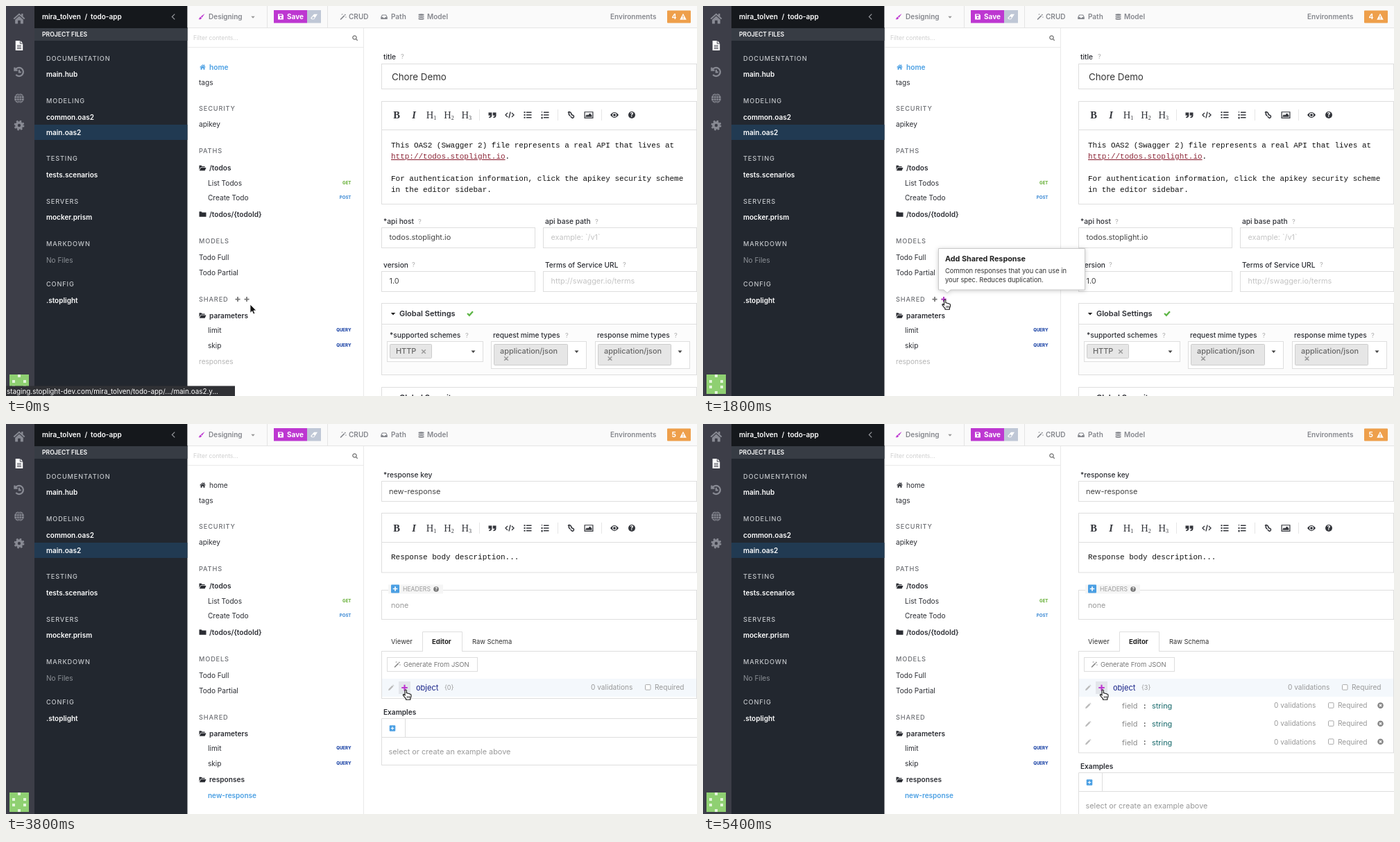
An HTML page for the animation above (5.5 s loop, 996x562 px).

```html
<!DOCTYPE html>
<html lang="en">
<head>
<meta charset="utf-8">
<title>API editor</title>
<style>
html, body { margin: 0; width: 100%; height: 100%; overflow: hidden; background: #fff }
svg { display: block; width: 996px; height: 562px; font-family: Inter, sans-serif }
text { white-space: pre }
.mono { font-family: "Liberation Mono", monospace }
.serif { font-family: "Liberation Serif", serif }
.caps { letter-spacing: .85px }
.end { text-anchor: end }
.mid { text-anchor: middle }
</style>
</head>
<body>
<svg id="stage" viewBox="0 0 996 562"></svg>
<script>
const LOOP = 5500, ROW = 26.1;
const BLUE = '#4a9fe3', PURPLE = '#bd37d1', LINE = '#dedede', INK = '#2b2d33';

// Paths are centred on the origin in a 16 unit box.
const ICONS = {
  home: 'M-8 0 0-7 3-4.4V-6.5H5.2V-2.5L8 0 6.5 1.2 0-4.6-6.5 1.2zM-5.5 1.6 0-3.2 5.5 1.6V7H1.8V2.6H-1.8V7H-5.5z',
  file: 'M-6-8H1V-3H6V8H-6zM2-8 6-4H2zM-3.5-.5V.7H3.5V-.5zM-3.5 2V3.2H3.5V2zM-3.5 4.5V5.7H3.5V4.5z',
  open: 'M-8-6H-3L-1.5-4H5V-2H-4.5L-8 4zM-4-1H8L5 6H-7.5z',
  folder: 'M-8-6H-3L-1.5-4H8V6H-8z',
  pencil: 'M-7 7-6 3 3-6 6-3-3 6zM4-7 5-8 8-5 7-4z',
  brush: 'M8-8 1 2-2-1zM-3 0 0 3C-1 7-5 7-8 6-5 5-6 1-3 0z',
  wand: 'M-8 6 2-4 4-2-6 8zM3-5 5-7 7-5 5-3zM-4-7H-2V-5H-4zM6 0H8V2H6zM-1-8H0V-7H-1z',
  inbox: 'M-5-5H5L8 1V6H-8V1zM-3.8-3.2-5.8 1H-2.5L-1.5 3H1.5L2.5 1H5.8L3.8-3.2z',
  stack: 'M-7-6.5Q0-9 7-6.5V-3.5Q0-1-7-3.5zM-7-2Q0 .5 7-2V1.5Q0 4-7 1.5zM-7 3Q0 5.5 7 3V6.5Q0 9-7 6.5z',
  save: 'M-7-7H4L7-4V7H-7zM-4-5.5V-2H3V-5.5zM-2 2.5A2 2 0 1 0 2 2.5 2 2 0 1 0-2 2.5z',
  eraser: 'M-8 3 0-6H8L0 6H-5zM-5.5 3-3.5 4.6H-1L1.5 1.2-2-.8z',
  warn: 'M0-8 8 7H-8zM-1-3V2H1V-3zM-1 3.5V5.5H1V3.5z',
  quote: 'M-8-5H-1V1Q-1 6-7 6V4Q-4 4-4 1H-8zM1-5H8V1Q8 6 2 6V4Q5 4 5 1H1z',
  list: 'M-8-7H-5V-4H-8zM-8-1.5H-5V1.5H-8zM-8 4H-5V7H-8zM-3-6.5H8V-4.5H-3zM-3-1H8V1H-3zM-3 4.5H8V6.5H-3z',
  ordered: 'M-7-8H-6V-4H-7zM-8-1.5H-5V1.5H-8zM-8 4H-5V8H-8zM-3-6.5H8V-4.5H-3zM-3-1H8V1H-3zM-3 4.5H8V6.5H-3z',
  image: 'M-8-6H8V6H-8zM-6.5-4.5V4.5H6.5V-4.5zM-5.5 3.5V1.5L-3-1-1.5.5 2-3 5.5.5V3.5z',
  eye: 'M-8 0Q0-11 8 0 0 11-8 0zM-4 0A4 4 0 1 0 4 0 4 4 0 1 0-4 0zM-2.5 0A2.5 2.5 0 1 0 2.5 0 2.5 2.5 0 1 0-2.5 0z',
  trash: 'M-6-5H6V-3H-6zM-2-7H2V-5H-2zM-5-2H5V8H-5z',
  plus: 'M-8-2H-2V-8H2V-2H8V2H2V8H-2V2H-8z',
  caret: 'M-8-4H8L0 5z',
};
const STROKES = {
  history: 'M-6-3A6.5 6.5 0 1 1-5 4.3M-7-7V-2.5H-2.5M0-3.5V.5H3',
  search: 'M-6-1A5 5 0 1 0 4-1 5 5 0 1 0-6-1M2.7 2.7 7 7',
  code: 'M-4-4-8 0-4 4M4-4 8 0 4 4M1.5-6-1.5 6',
  link: 'M-1 2-3.5-.5A2.8 2.8 0 0 1-3.5-4L-5-5.5A2.5 2.5 0 0 1-1.5-6L1-3.5A2.5 2.5 0 0 1 1 0M1-2 3.5.5A2.8 2.8 0 0 1 6.5 4L5.5 5.5A2.5 2.5 0 0 1 2 5.5L-.5 3',
  check: 'M-7 0-2 5 7-5',
  cross: 'M-5-5 5 5M5-5-5 5',
  back: 'M4-7-3 0 4 7',
};

// y is the visual middle of the line.
const text = (x, y, s, size = 10.1, fill = INK, weight = 400, cls = '') =>
  `<text x="${x}" y="${y + size * .36}" font-size="${size}" fill="${fill}" font-weight="${weight}" class="${cls}">${s}</text>`;
const rect = (x, y, w, h, fill, stroke = 'none', r = 0) =>
  `<rect x="${x}" y="${y}" width="${w}" height="${h}" rx="${r}" fill="${fill}" stroke="${stroke}"/>`;
const box = (x, y, w, h) => rect(x, y, w, h, '#fff', LINE);
const line = (d, color = LINE) => `<path d="${d}" stroke="${color}" fill="none"/>`;
const icon = (name, x, y, size, color) =>
  `<path d="${ICONS[name]}" transform="translate(${x} ${y}) scale(${size / 16})" fill="${color}" fill-rule="evenodd"/>`;
const outline = (name, x, y, size, color, w = 2.4) =>
  `<path d="${STROKES[name]}" transform="translate(${x} ${y}) scale(${size / 16})" fill="none" stroke="${color}" stroke-width="${w}"/>`;
const group = (id, ...parts) => `<g id="${id}">${parts.join('')}</g>`;
const caps = (x, y, s, fill) => text(x, y, s, 9.2, fill, 500, 'caps');
const label = (x, y, s, hintX) => text(x, y, s, 10.2, INK, 500) + (hintX ? text(hintX, y, '?', 9, '#b5b5b5', 500) : '');
const help = (x, y, r, fill) =>
  `<circle cx="${x}" cy="${y}" r="${r}" fill="${fill}"/>` + text(x, y, '?', r * 1.7, '#fff', 800, 'mid');
const bluePlus = (x, y, size) => rect(x - size / 2, y - size / 2, size, size, BLUE, 'none', 1) + icon('plus', x, y, size * .55, '#fff');

function rail() {
  const gray = '#888a93', bg = '#3d3e48';
  let avatar = rect(5, 531, 28, 28, '#8fd072');
  for (let i = 0; i < 7; i++) for (let j = 0; j < 7; j++) {
    const a = Math.abs(i - 3), b = Math.abs(j - 3);
    if ((a * 2 + b * 3 + a * b) % 4 === 1) avatar += rect(5 + i * 4, 531 + j * 4, 4, 4, '#e3f5da');
  }
  return rect(0, 0, 41, 562, bg) + icon('home', 19, 18, 17, gray) + icon('file', 19, 57, 14, '#fff') +
    outline('history', 19, 95, 15, gray) +
    `<circle cx="19" cy="133" r="7" fill="${gray}"/><path d="M12 133H26M19 126V140M13.5 129.5H24.5M13.5 136.5H24.5" stroke="${bg}" stroke-width=".8"/><ellipse cx="19" cy="133" rx="3.4" ry="7" fill="none" stroke="${bg}" stroke-width=".8"/>` +
    `<g fill="none" stroke="${gray}"><circle cx="19" cy="172" r="4" stroke-width="3.6"/><circle cx="19" cy="172" r="6.2" stroke-width="2.4" stroke-dasharray="2.5 2.37"/></g>` + avatar;
}

function files() {
  const head = [['DOCUMENTATION', 76], ['MODELING', 137], ['TESTING', 220], ['SERVERS', 282], ['MARKDOWN', 343], ['CONFIG', 401]];
  const names = [['main.hub', 98], ['common.oas2', 160], ['main.oas2', 182], ['tests.scenarios', 243.5], ['mocker.prism', 304.5], ['.stoplight', 424.5]];
  return rect(41, 0, 220.5, 562, '#22272f') + rect(41, 0, 220.5, 32, '#15181c') + rect(41, 32, 220.5, 18, '#373c44') +
    rect(41, 171, 220.5, 22, '#213a52') +
    text(52, 15.5, 'mira_tolven', 10, '#fff', 600) + text(113.5, 15.5, '/', 10, '#fff', 600) + text(122, 15.5, 'todo-app', 10, '#fff', 600) +
    outline('back', 241, 15.5, 9, '#9a9ca1', 2) + text(52, 41, 'PROJECT FILES', 8.6, '#fff', 600) +
    head.map(([s, y]) => caps(58, y, s, '#c3c6ca')).join('') +
    names.map(([s, y]) => text(58, y, s, 10, '#fff', 600)).join('') +
    text(58, 366.5, 'No Files', 10.1, '#8c9096');
}

function topBar() {
  const gray = '#85878d', tab = (x, s) => text(x, 15.5, s, 10, gray, 600);
  return rect(261.5, 0, 734.5, 31, '#fafafa') + line('M262 31.5H996M376.5 0V31M463.5 0V31', '#e4e4e4') +
    icon('brush', 282, 15.5, 9, PURPLE) + tab(292, 'Designing') + icon('caret', 356, 16, 5.5, '#999') +
    rect(386, 6, 48, 18.5, PURPLE) + rect(434, 6, 20, 18.5, '#bfc7d6') + icon('save', 396, 15.5, 9, '#fff') +
    text(405, 15.5, 'Save', 10, '#fff', 700) + icon('eraser', 444, 15.5, 10, '#fff') +
    icon('wand', 486, 15.5, 9, gray) + tab(494, 'CRUD') + icon('inbox', 545, 15.5, 9.5, gray) + tab(555, 'Path') +
    icon('stack', 598.5, 15.5, 9, gray) + tab(607, 'Model') + tab(871, 'Environments') +
    rect(953, 6.5, 34, 18, '#ee9f4b', 'none', 1) + icon('warn', 976, 15.5, 9.5, '#fff') +
    '<text id="badge" x="959.5" y="19.2" font-size="10.3" font-weight="700" fill="#fff"></text>';
}

function contents() {
  const item = (x, y, s) => text(x, y, s);
  const folder = (y, s, name = 'open') => icon(name, 283.5, y, 10, INK) + text(293, y, s, 10.1, INK, 600);
  const method = (y, s, fill) => text(497.5, y, s, 6.1, fill, 800, 'end');
  const head = [['SECURITY', 148], ['PATHS', 209], ['MODELS', 339], ['SHARED', 422.5]];
  return rect(262, 32, 253, 530, '#fff') + line('M515.5 32V562M262 59.5H515', '#e9e9e9') +
    text(270, 46, 'Filter contents...', 8.5, '#cfcfcf') + outline('search', 503, 46, 8.5, '#777') +
    head.map(([s, y]) => caps(278, y, s, '#6c6e73')).join('') +
    group('homeOn', icon('home', 283.5, 88, 8.5, BLUE), text(293, 88, 'home', 10.2, BLUE, 600)) +
    group('homeOff', icon('home', 283.5, 88, 8.5, INK), item(293, 88, 'home')) +
    item(278, 110, 'tags') + item(278, 170.5, 'apikey') + folder(233.5, '/todos') +
    item(291, 255, 'List Todos') + method(254.5, 'GET', '#6db33f') + item(291, 276.5, 'Create Todo') + method(276, 'POST', '#4d94d8') +
    folder(300, '/todos/{todoId}', 'folder') + item(278, 362, 'Todo Full') + item(278, 384, 'Todo Partial') +
    group('adders', icon('plus', 334, 422.5, 7, '#777'), icon('plus', 347, 422.5, 7, '#777')) +
    group('adderHot', icon('plus', 347, 422.5, 7, PURPLE)) +
    folder(446, 'parameters') + item(291, 467.5, 'limit') + item(291, 489, 'skip') +
    method(467, 'QUERY', '#2148a8') + method(488.5, 'QUERY', '#2148a8') +
    group('noResponses', text(278, 512.5, 'responses', 10.1, '#b5b5b5')) +
    group('newItem', folder(512.5, 'responses'), text(291, 535, 'new-response', 10, BLUE, 600)) +
    group('remove', rect(495, 436, 19.5, 21.5, '#e4e4e4'), icon('trash', 505, 447, 6, '#aaa'));
}

function toolbar(y) {
  const ink = '#33353b', serif = (x, s, extra) => `<text x="${x}" y="${y + 5}" font-size="14.5" fill="${ink}" class="serif mid" ${extra}>${s}</text>`;
  const heading = n => serif(613 + (n - 1) * 25.4, `H<tspan font-size="8" dy="2">${n}</tspan>`, 'font-weight="400"');
  return serif(563, 'B', 'font-weight="700"') + serif(588, 'I', 'font-weight="700" font-style="italic"') +
    [1, 2, 3].map(heading).join('') + line(`M682.5 ${y - 8}V${y + 8}M795.5 ${y - 8}V${y + 8}M858.5 ${y - 8}V${y + 8}`, '#e6e6e6') +
    icon('quote', 701, y, 11, ink) + outline('code', 726, y, 12, ink, 1.8) + icon('list', 752, y, 11, ink) + icon('ordered', 777, y, 11, ink) +
    outline('link', 814, y, 11, ink, 2.2) + icon('image', 840, y, 13, ink) + icon('eye', 877, y, 12, ink) + help(902, y, 5, ink);
}

function homePanel() {
  const mono = (y, s) => text(555, y, s, 10.97, '#111', 400, 'mono');
  const field = (x, y, s, fill = '#444') => box(x, y, 221, 29) + text(x + 11, y + 14, s, 10.9, fill);
  const chooser = (x, w, h, s, tagW, tagH, crossX, crossY) => box(x + .5, 483.5, w, h) +
    rect(x + 4.5, 487.5, tagW, tagH, '#e6e6e6', '#ccc', 1) + text(x + 13, 497.5, s, 10.9, '#666', 500) +
    outline('cross', crossX, crossY, 9, '#999', 2.6) + icon('caret', x + w - 13.5, 498, 6, '#444');
  return label(544, 73, 'title', 569) + box(541.5, 83.5, 454, 36) + text(556, 102, 'Chore Demo', 13.3, '#333') +
    box(541.5, 137.5, 454, 148) + line('M542 178.5H995') + toolbar(157) +
    mono(200, 'This OAS2 (Swagger 2) file represents a real API that lives at') +
    mono(216, '<tspan fill="#8c2637" text-decoration="underline">http://todos.stoplight.io</tspan>.') +
    mono(248, 'For authentication information, click the apikey security scheme') + mono(264, 'in the editor sidebar.') +
    label(544, 310.5, '*api host', 594) + label(777, 310.5, 'api base path', 849) +
    label(544, 373, 'version', 585) + label(777, 373, 'Terms of Service URL', 889) +
    field(541.5, 319.5, 'todos.stoplight.io') + field(774.5, 319.5, 'example: `/v1`', '#c4c4c4') +
    field(541.5, 382.5, '1.0') + field(774.5, 382.5, 'http://swagger.io/terms', '#c4c4c4') +
    box(541.5, 428.5, 454, 103) + rect(542, 458, 453, 73, '#fcfcfc') + line('M542 458.5H995') +
    icon('caret', 558, 443.5, 6.5, '#222') + text(567, 443, 'Global Settings', 11, INK, 600) + outline('check', 669, 443, 9, '#5cb544', 4) +
    label(553, 474.5, '*supported schemes', 662) + label(702, 474.5, 'request mime types', 806) + label(852, 474.5, 'response mime types', 963) +
    chooser(549, 138, 29, 'HTTP', 60, 20, 602, 498) + chooser(699, 137, 39, 'application/json', 106, 30, 721, 508) +
    chooser(849, 136, 39, 'application/json', 105, 30, 870.5, 508) +
    box(541.5, 549.5, 454, 40) + icon('caret', 558, 564, 6.5, '#222') + text(567, 564, 'Global Security', 11, INK, 600);
}

function responsePanel() {
  const checks = (x, y) => text(x, y, '0 validations', 10.1, '#999') + rect(x + 78.5, y - 4, 7.5, 7.5, '#fff', '#aaa', 1) + text(x + 92, y, 'Required', 10.1, '#999');
  const row = n => group('row' + n, icon('pencil', 555, 380 + n * ROW, 9, '#bbb'), text(604, 380.3 + n * ROW, 'field', 10.9, '#8b8b8b'),
    text(635, 380 + n * ROW, ':', 10.9, '#333', 600), text(647, 380.3 + n * ROW, 'string', 10.9, '#17696b'),
    checks(823, 379.6 + n * ROW), `<circle cx="976.5" cy="${379.5 + n * ROW}" r="4.3" fill="#888"/>`, outline('cross', 976.5, 379.5 + n * ROW, 5, '#fff', 4));
  return label(544, 73, '*response key') + box(541.5, 82.5, 454, 29) + text(552, 97.5, 'new-response', 10.9, '#444') +
    box(541.5, 128.5, 454, 85.5) + line('M542 170.5H995') + toolbar(150) + text(555, 191.5, 'Response body description...', 10.97, '#111', 400, 'mono') +
    box(541.5, 239.5, 454, 42) + rect(551, 231.5, 79, 13, '#f5f5f5') + bluePlus(561, 237.5, 12) +
    text(572, 238, 'HEADERS', 8.6, '#999') + help(620, 238, 3.8, '#777') + text(555, 261.5, 'none', 10.7, '#999') +
    '<rect id="editor" x="541.5" y="327.5" width="454" fill="#fff" stroke="#dedede"/>' +
    line('M600.5 328V299.5H657.5V328') + line('M601 327.5H657', '#fff') +
    text(555, 314, 'Viewer', 9.45, '#333') + text(614, 314, 'Editor', 9.6, '#222', 700) + text(672, 314, 'Raw Schema', 9.35, '#333') +
    box(549.5, 336.5, 130, 20) + icon('wand', 564, 346.5, 9, '#888') + text(573, 347, 'Generate From JSON', 9.45, '#777') +
    group('rowHover', rect(542, 367, 453, 26, '#f4f8fc'), rect(566, 371, 17, 18, '#e3e6eb')) +
    icon('pencil', 555, 380, 9, '#bbb') + group('addField', icon('plus', 574.5, 380, 8.5, '#bbb')) + group('addFieldHot', icon('plus', 574.5, 380, 8.5, PURPLE)) +
    text(591, 380.3, 'object', 11, '#141f86') + '<text id="count" x="632" y="383.4" font-size="9" fill="#999"></text>' + checks(843, 379.6) +
    [1, 2, 3].map(row).join('') +
    group('examples', text(544, 415, 'Examples', 10.1, INK, 600), line('M541.5 491V424.5H996M542 451.5H996M575.5 425V451'),
      group('exampleBase', line('M541 491.5H996')), bluePlus(557, 438.5, 8.5), text(551.5, 472, 'select or create an example above', 10.85, '#999'));
}

const tooltip = () => '<path d="M339.5 349.5H550.5V409H357L352 413.5 347 409H339.5z" fill="#fff" stroke="#c9c9c9" style="filter:drop-shadow(0 1px 3px #0003)"/>' +
  text(349, 364.5, 'Add Shared Response', 10.8, '#222', 700) +
  text(349, 381.5, 'Common responses that you can use in', 9.4, '#333') + text(349, 394.5, 'your spec. Reduces duplication.', 9.4, '#333');
const status = () => rect(0, 547.5, 330, 15, '#303135') +
  text(1, 555, 'staging.stoplight-dev.com/mira_tolven/todo-app/.../main.oas2.y...', 9.9, '#fff');
const cursor = () => group('arrow', '<path d="M0 0V12.3L2.8 9.7 4.7 14 6.8 13.1 4.9 8.9H8.7z" fill="#111" stroke="#fff" stroke-width=".8"/>') +
  group('hand', '<path d="M4 1.2c1-.6 1.8.1 1.8 1V6l.2-.4 1.6.3.5.4 1.6.2.5.5 1.4.3c.8.4 1 1 .9 2.3-.1 2-.6 2.6-1.2 4v1.6H5v-1.3C3.8 12.5 2 11 .9 8.8c-.3-1 .6-1.5 1.3-1l1.3 1.1V2c0-.4.1-.6.5-.8z" fill="#fff" stroke="#111" stroke-width="1.1"/><path d="M6.8 10v3M8.6 10v3M10.2 10v3" stroke="#111" stroke-width=".7"/>');

const stage = document.getElementById('stage');
stage.innerHTML = rect(0, 0, 996, 562, '#fff') + group('homePanel', homePanel()) + group('responsePanel', responsePanel()) +
  rail() + files() + topBar() + contents() + group('tooltip', tooltip()) + group('status', status()) + group('cursor', cursor());

const el = id => document.getElementById(id);
const show = (id, on) => el(id).setAttribute('visibility', on ? 'inherit' : 'hidden');
const PATH = [[0, 352, 430], [200, 344, 422], [2400, 344, 422], [2900, 476, 447], [3200, 540, 425], [3700, 571.5, 382], [LOOP, 571.5, 382]];

function pointer(t) {
  const i = PATH.findIndex(p => p[0] > t), [t0, x0, y0] = PATH[i - 1], [t1, x1, y1] = PATH[i];
  const k = (t - t0) / (t1 - t0);
  return `translate(${x0 + (x1 - x0) * k} ${y0 + (y1 - y0) * k})`;
}

function draw(now) {
  const t = Math.floor(now % LOOP / 100) * 100;
  const created = t >= 2200, overField = t >= 3700, overAdder = t >= 200 && t < 2500;
  const fields = [4300, 4700, 5100].filter(at => t >= at).length;
  const hand = t >= 200 && t < 3100 || overField;
  const visible = {
    homePanel: !created, homeOn: !created, noResponses: !created,
    responsePanel: created, homeOff: created, newItem: created,
    status: t < 200, tooltip: t >= 200 && t < 3100, adders: t < 3100, adderHot: overAdder,
    remove: t >= 2700 && t < 3100, rowHover: overField, addField: !overField, addFieldHot: overField,
    row1: fields > 0, row2: fields > 1, row3: fields > 2, exampleBase: fields !== 1, hand, arrow: !hand,
  };
  for (const id in visible) show(id, visible[id]);
  el('badge').textContent = t < 3300 ? 4 : 5;
  el('count').textContent = `{${fields}}`;
  el('editor').setAttribute('height', 68 + fields * ROW);
  el('examples').setAttribute('transform', `translate(0 ${fields * 26})`);
  el('cursor').setAttribute('transform', pointer(t));
  requestAnimationFrame(draw);
}
requestAnimationFrame(draw);
</script>
</body>
</html>
```
